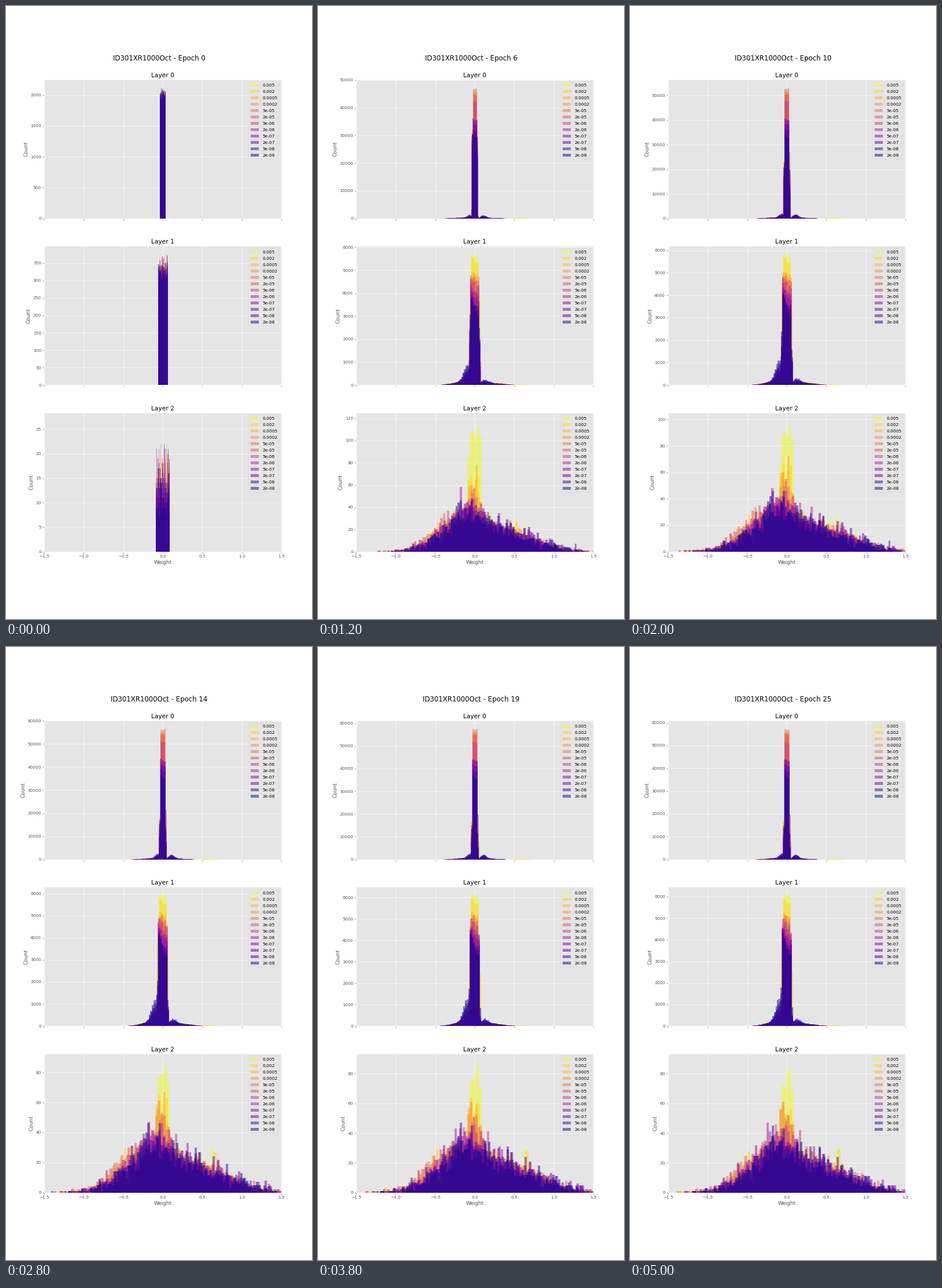
A matplotlib script for the animation above (5200 ms loop, 529x1058 px).

```python
import math

import matplotlib.pyplot as plt
import numpy as np
from matplotlib.animation import FuncAnimation
from matplotlib.collections import PolyCollection

plt.style.use("ggplot")

EPOCHS, BINS = 26, 100
RATES = ["0.005", "0.002", "0.0005", "0.0002", "5e-05", "2e-05",
         "5e-06", "2e-06", "5e-07", "2e-07", "5e-08", "2e-08"]
LAST = len(RATES) - 1
COLORS = [plt.cm.plasma(1 - k / LAST) for k in range(LAST + 1)]

SIZES = [784 * 256, 256 * 128, 128 * 10]
BOUNDS = [784 ** -0.5, 256 ** -0.5, 128 ** -0.5]

# Tallest bar of each layer at a few epochs
KEYS = [0, 1, 3, 6, 10, 14, 17, 22, 25]
PEAKS = [
    [2145, 22000, 37000, 47820, 53790, 57270, 58360, 58160, 58040],
    [380, 3500, 5100, 5762, 5888, 5997, 6192, 6145, 6136],
    [27, 85, 115, 119, 100, 88, 91, 86, 89],
]
# Height of the central block relative to the peak, per series
CORE = [
    [.96, .92, .95, .95, .98, .93, .88, .74, .74, .70, .66, .61],
    [.96, .93, .82, .80, .78, .76, .73, .68, .64, .60, .56, .53],
]

rng = np.random.default_rng(7)
NOISE = rng.standard_normal((3, LAST + 1, 2, BINS))
SHIFT = rng.uniform(-0.12, 0.12, (3, LAST + 1))

erf = np.vectorize(math.erf, otypes=[float])


def bell(x, center, sd):
    return 0.5 * (1 + erf((x - center) / (sd * math.sqrt(2))))


def block(x, bound, skew=0.0):
    u = np.clip((x + bound) / (2 * bound), 0, 1)
    return u + skew * u * (1 - u)


def tails(layer, k, epoch):
    """Components (weight, center, sd) that have left the initial block."""
    t = k / LAST
    if layer == 0:
        s = 1 - math.exp(-epoch / 6)
        parts = [(.07 * t * t, -.06, .035), (.06 * t * t, .11, .035),
                 (.028, -.19 + .05 * t, .08), (.022, .18, .08)]
    else:
        s = 1 - math.exp(-epoch / 3.5)
        parts = [(.22 * t * t, -.09, .05), (.04 * t * t, .13, .045),
                 (.07, -.16, .12), (.055, .2, .14)]
    if k < 2:
        parts.append((.005, .6, .05))
    return [(w * s, c, sd) for w, c, sd in parts]


def hidden_layer(layer, k, epoch, peak):
    n, bound = SIZES[layer], BOUNDS[layer]
    parts = tails(layer, k, epoch)
    core = 1 - sum(p[0] for p in parts)
    width = CORE[layer][k] * peak * 2 * bound / (n * core)
    center = 45.5 if layer == 0 and k < 7 else 45
    edges = (np.arange(BINS + 1) - center - SHIFT[layer, k]) * width
    skew = 0.04 * k / LAST if layer else 0
    cdf = core * block(edges, bound, skew)
    return edges, cdf + sum(w * bell(edges, c, sd) for w, c, sd in parts)


def output_layer(k, epoch, peak):
    n, bound = SIZES[2], BOUNDS[2]
    t = k / LAST
    spread = 1 - math.exp(-epoch / 2.7)
    width = (0.031 - 0.003 * t) * (1 - math.exp(-epoch / 1.5))
    edges = (np.arange(BINS + 1) - 49 - 2 * SHIFT[2, k]) * width
    if k == 0:
        core = max(0.92 * peak - 30, 0) * 2 * bound / (n * width)
        core = min(core, 0.6)
    else:
        core = 0.13 * max(0, 1 - (k - 1) / 4)
    extra = [(.03, .62, .05)] if k < 2 else [(.05, -.07, .13)]
    if k == 7:
        extra.append((.014, -.22, .01))
    rest = 1 - core - sum(p[0] for p in extra)
    parts = extra + [(.66 * rest, -.20 + .08 * t, .35),
                     (.34 * rest, .45 + .17 * t, .37)]
    cdf = core * block(edges, bound)
    return edges, cdf + sum(w * bell(edges, c * spread, sd * spread)
                            for w, c, sd in parts)


def histogram(layer, k, epoch, peak):
    if epoch == 0:
        edges = np.linspace(-BOUNDS[layer], BOUNDS[layer], BINS + 1)
        cdf = block(edges, BOUNDS[layer])
    elif layer < 2:
        edges, cdf = hidden_layer(layer, k, epoch, peak)
    else:
        edges, cdf = output_layer(k, epoch, peak)
    mean = SIZES[layer] * np.maximum(np.diff(cdf), 0)
    a, b = NOISE[layer, k]
    z = a * math.cos(0.06 * epoch) + b * math.sin(0.06 * epoch)
    counts = mean + np.sqrt(mean) * z + np.where(mean > 1, (z * z - 1) / 6, 0)
    return edges, np.clip(np.round(counts), 0, peak)


def bars(edges, counts):
    left, right, zero = edges[:-1], edges[1:], np.zeros(BINS)
    x = np.stack([left, right, right, left], axis=1)
    y = np.stack([zero, zero, counts, counts], axis=1)
    return np.stack([x, y], axis=2)


fig, axes = plt.subplots(3, 1, sharex=True, figsize=(10, 20), dpi=52.9)
heading = fig.suptitle("", y=0.921, fontsize=16)
series = []
for i, ax in enumerate(axes):
    ax.set_title(f"Layer {i}")
    ax.set_ylabel("Count")
    ax.set_xlim(-1.5, 1.5)
    row = [PolyCollection([], facecolors=[c], edgecolors="none",
                          linewidths=0, alpha=0.5) for c in COLORS]
    for coll in row:
        ax.add_collection(coll, autolim=False)
    series.append(row)
    keys = [plt.Rectangle((0, 0), 1, 1, fc=c, ec="none", alpha=0.5)
            for c in COLORS]
    ax.legend(keys, RATES, loc="upper right", labelspacing=0.66,
              bbox_to_anchor=(1, 0.9975))
axes[-1].set_xlabel("Weight")


def update(epoch):
    heading.set_text(f"ID301XR1000Oct - Epoch {epoch}")
    for layer, ax in enumerate(axes):
        peak = np.interp(epoch, KEYS, PEAKS[layer])
        ax.set_ylim(0, 1.05 * peak)
        for k, coll in enumerate(series[layer]):
            coll.set_verts(bars(*histogram(layer, k, epoch, peak)))
    return []


anim = FuncAnimation(fig, update, frames=EPOCHS, init_func=lambda: [],
                     interval=200, repeat=True, repeat_delay=0, blit=False)
plt.show()
```
